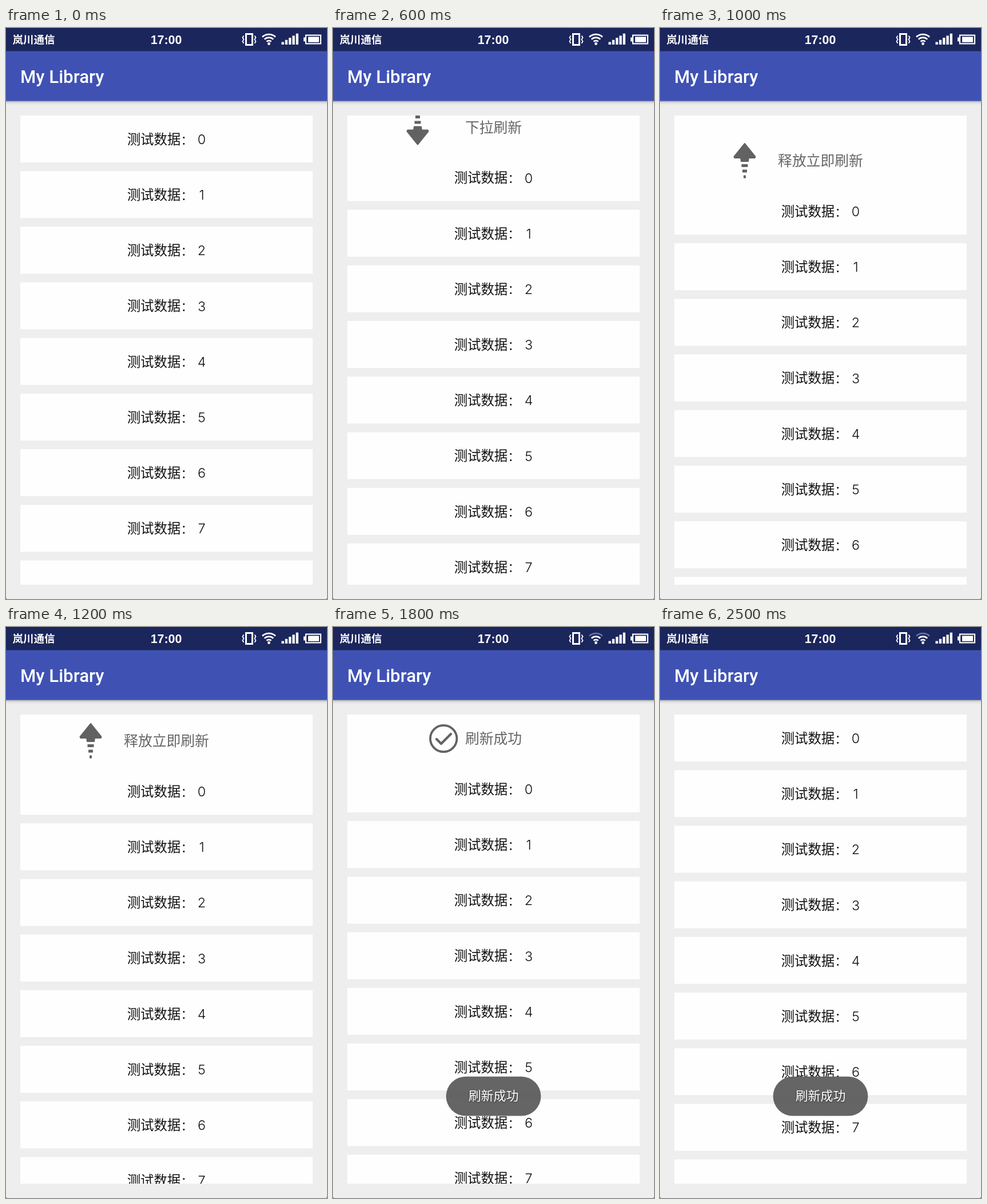
Recreate the animation shown at these times as an HTML page with a canvas. Size 561 px wide and 998 px high, loop 2.8 s.

```html
<!DOCTYPE html>
<html lang="zh-CN">
<head>
<meta charset="utf-8">
<title>Pull to refresh</title>
<style>
html, body { margin: 0; width: 100%; height: 100%; overflow: hidden; background: #000; }
canvas { display: block; border-radius: 2px; }
</style>
</head>
<body>
<canvas id="stage" width="561" height="998"></canvas>
<script>
const ctx = document.getElementById('stage').getContext('2d');
const LOOP = 2800, STEP = 100;
const CJK = '"Noto Sans CJK SC", "Noto Sans CJK", sans-serif';
const LIST = { x: 25, y: 153, w: 511, h: 820 };
const CARD_H = 82, PITCH = 97.2, REST = 89, ROWS = 8;
const GREY = '#626262';

const lerp = (a, b, p) => a + (b - a) * p;
const clamp = v => Math.max(0, Math.min(1, v));

// Piecewise linear value through [time, value] points.
function track(points, t) {
  let last = points[0];
  for (const p of points) {
    if (t < p[0]) return lerp(last[1], p[1], clamp((t - last[0]) / (p[0] - last[0])));
    last = p;
  }
  return last[1];
}

const PULL = [
  [300, 0], [400, 20.7], [500, 44], [600, 67.5], [700, 87], [800, 105], [900, 118], [1000, 126],
  [1100, 108], [1200, 93], [1300, REST], [2100, REST], [2200, 62], [2300, 33], [2400, 11], [2500, 0]
];
const TURN = [[700, Math.PI], [900, 0]];
const TOAST = [[1300, 0.2], [1400, 0.6], [1500, 0.85], [1600, 0.97]];

function rect(x, y, w, h, color) {
  ctx.fillStyle = color;
  ctx.fillRect(x, y, w, h);
}

function text(str, x, y, font, color, align = 'left') {
  ctx.font = font;
  ctx.textAlign = align;
  ctx.fillStyle = color;
  ctx.fillText(str, x, y);
}

function line(points, width, color) {
  ctx.beginPath();
  points.forEach(([x, y]) => ctx.lineTo(x, y));
  ctx.lineWidth = width;
  ctx.strokeStyle = color;
  ctx.stroke();
}

function ring(x, y, r, from, to, width, color) {
  ctx.beginPath();
  ctx.arc(x, y, r, from, to);
  ctx.lineWidth = width;
  ctx.strokeStyle = color;
  ctx.stroke();
}

function drawVibrate() {
  ctx.lineWidth = 3;
  ctx.strokeStyle = '#fff';
  ctx.strokeRect(419.5, 10.5, 11, 19);
  for (const [x, dir] of [[414.5, -1], [435.5, 1]]) {
    const zigzag = [0, 1, 2, 3, 4].map(i => [x + (i % 2 ? dir : -dir), 13.5 + i * 3.3]);
    line(zigzag, 1.8, '#fff');
  }
}

function drawWifi(weak) {
  const up = -Math.PI / 2;
  [17, 11.5, 6].forEach((r, i) => {
    const color = weak && i === 0 ? '#66709c' : '#fff';
    ring(459.5, 28.2, r, up - 0.74, up + 0.74, 2.8, color);
  });
  ctx.beginPath();
  ctx.arc(459.5, 27.5, 2.4, 0, 7);
  ctx.fillStyle = '#fff';
  ctx.fill();
}

function drawStatus(weak) {
  rect(0, 0, 561, 41, '#1b265c');
  text('岚川通信', 11.5, 26.5, `bold 18.5px ${CJK}`, '#fff');
  text('17:00', 280, 28, 'bold 21.3px "Liberation Sans", Arial, sans-serif', '#fff', 'center');
  drawVibrate();
  drawWifi(weak);
  for (let i = 0; i < 5; i++) {
    const h = 4.5 + i * 3.7;
    rect(481.5 + i * 6.3, 29 - h, 4.3, h, '#fff');
  }
  ctx.lineWidth = 2.2;
  ctx.strokeStyle = '#fff';
  ctx.strokeRect(524, 12.6, 26, 14.8);
  rect(520, 16.5, 3.5, 7, '#fff');
  rect(528, 15.4, 19, 9.4, '#fff');
}

function drawToolbar() {
  const shade = ctx.createLinearGradient(0, 127.5, 0, 134.5);
  shade.addColorStop(0, '#a9a9ab');
  shade.addColorStop(0.4, '#dadada');
  shade.addColorStop(1, '#eeeeee');
  rect(0, 127, 561, 8, shade);
  rect(0, 40.5, 561, 87, '#3f52b4');
  text('My Library', 25, 95.5, '500 31.2px Roboto, sans-serif', '#fff');
}

function drawArrow(y, angle) {
  ctx.save();
  ctx.translate(148, y);
  ctx.rotate(angle);
  ctx.fillStyle = ctx.strokeStyle = GREY;
  ctx.lineWidth = 2;
  ctx.lineJoin = 'round';
  ctx.beginPath();
  [[0, -30], [18.5, -7], [17.5, -5], [7, -5], [6, 1], [-6, 1], [-7, -5], [-17.5, -5], [-18.5, -7]]
    .forEach(([x, v]) => ctx.lineTo(x, v));
  ctx.closePath();
  ctx.fill();
  ctx.stroke();
  [[6, 11], [15.5, 8], [25.5, 4]].forEach(([v, w]) => ctx.fillRect(-w / 2, v, w, 5));
  ctx.restore();
}

function drawCheck(y) {
  ring(193.2, y, 23.2, 0, 7, 3.8, GREY);
  ctx.lineCap = ctx.lineJoin = 'round';
  line([[181, y + 1], [189, y + 9], [206, y - 8]], 4.2, GREY);
  ctx.lineCap = 'butt';
  ctx.lineJoin = 'miter';
}

function drawHeader(t, pull) {
  const y = 106 + pull;
  let label = '刷新成功';
  if (t >= 1300) {
    drawCheck(y);
  } else {
    label = t < 800 ? '下拉刷新' : '释放立即刷新';
    drawArrow(y, track(TURN, t));
  }
  text(label, 280.5, y + 9.3, `24.8px ${CJK}`, '#666', 'center');
}

function drawList(t, pull) {
  ctx.save();
  ctx.beginPath();
  ctx.rect(LIST.x, LIST.y, LIST.w, LIST.h);
  ctx.clip();
  rect(LIST.x, LIST.y, LIST.w, pull + 1, '#fefefe');
  for (let i = 0; i <= ROWS; i++) {
    const y = LIST.y + pull + i * PITCH;
    rect(LIST.x, y, LIST.w, CARD_H, '#fefefe');
    if (i === ROWS) break; // the last card is still empty
    text('测试数据', 211.7, y + 49.8, `500 23.4px ${CJK}`, '#111');
    text('：', 305.5, y + 49.5, `300 21px ${CJK}`, '#111');
    text(i, 342, y + 50, '300 23.3px Inter, "Open Sans", sans-serif', '#111', 'center');
  }
  if (pull > 0) drawHeader(t, pull);
  ctx.restore();
}

function drawToast(alpha) {
  ctx.save();
  ctx.globalAlpha = alpha;
  ctx.beginPath();
  ctx.roundRect(197.6, 785.7, 165.8, 68.8, 34.4);
  ctx.fillStyle = '#616161';
  ctx.fill();
  ctx.globalAlpha = Math.min(1, alpha * 1.5);
  ctx.shadowColor = 'rgba(0,0,0,.5)';
  ctx.shadowBlur = 3;
  ctx.shadowOffsetY = 1;
  text('刷新成功', 280.5, 826.8, `21.9px ${CJK}`, '#fff', 'center');
  ctx.restore();
}

function draw(now) {
  const t = Math.floor((now % LOOP) / STEP) * STEP;
  rect(0, 0, 561, 998, '#eeeeee');
  drawStatus(t >= 1400);
  drawToolbar();
  drawList(t, track(PULL, t));
  if (t >= 1300) drawToast(track(TOAST, t));
}

const start = performance.now();
function frame() {
  draw(performance.now() - start);
  requestAnimationFrame(frame);
}
frame();
</script>
</body>
</html>
```
